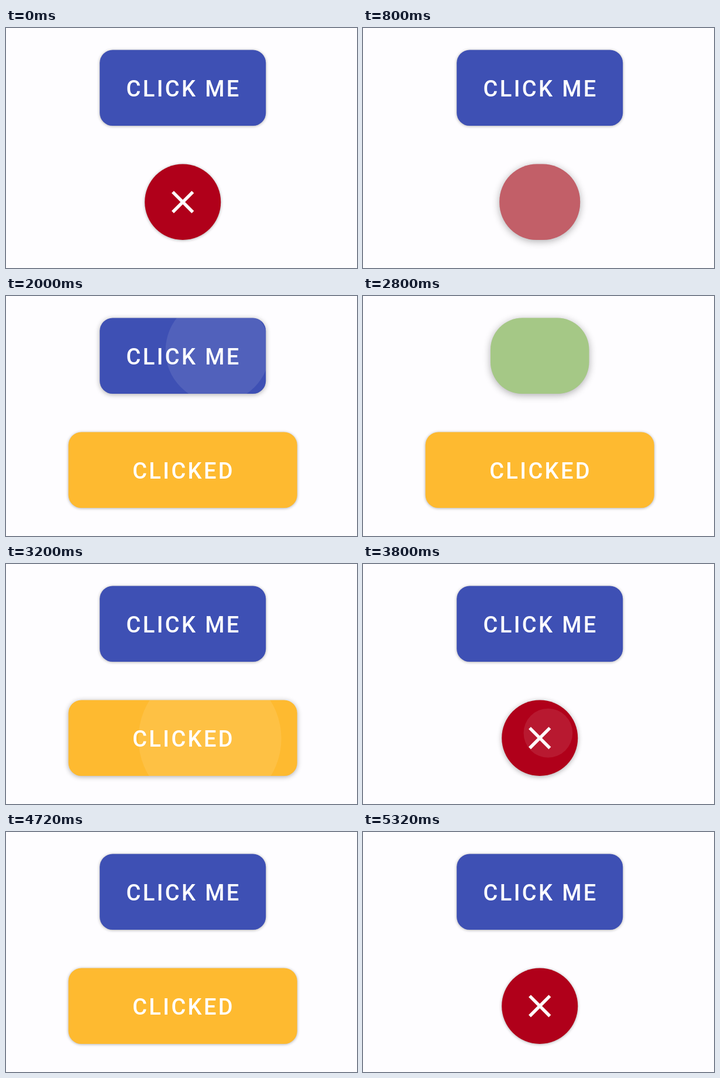
An HTML page with a canvas that plays this animation: 600x410 px, repeating every 5400 ms.

```html
<!DOCTYPE html>
<html lang="en">
<head>
<meta charset="utf-8">
<title>Morphing buttons</title>
<style>
  html, body { margin: 0; width: 100%; height: 100%; overflow: hidden; background: #fefdff; }
  canvas { display: block; }
</style>
</head>
<body>
<canvas id="stage" width="600" height="410"></canvas>
<script>
const ctx = document.getElementById('stage').getContext('2d');
const LOOP = 5400, STEP = 40, HEIGHT = 129.5, UNIT = 2.73;
const TOUCH_LEAD = 31; // a press begins shortly before its first visible step

const rect = (width, color, label, touch) => ({ width, radius: 22, color, label, touch });
const circle = (color, icon, touch) => ({ width: 130, radius: 65, color, icon, touch });

const cross = [[[-6.3, -6.3], [6.3, 6.3]], [[6.3, -6.3], [-6.3, 6.3]]];
const check = [[[-7.9, 0.7], [-3, 5.6], [8.3, -5.7]]];

const blue = rect(284, [62, 80, 180], 'CLICK ME', [63, -10]);
const green = circle([153, 204, 0], check, [15, -9]);
const red = circle([176, 0, 26], cross, [15, -9]);
const cyan = rect(391, [0, 221, 255], 'CLICKED', [49, 1]);
const amber = rect(391, [254, 186, 48], 'CLICKED', [49, 1]);

const buttons = [
  { y: 102.3, rest: blue, clicks: [[2000, blue, green], [2640, green, blue]] },
  { y: 297.3, rest: red, clicks: [
    [720, red, cyan], [1280, cyan, amber], [3200, amber, red],
    [3800, red, cyan], [4360, cyan, amber], [4960, amber, red]] }
];

const clamp = x => Math.min(1, Math.max(0, x));
const mix = (a, b, p) => a + (b - a) * p;
const swing = x => 0.5 - Math.cos(Math.PI * x) / 2;
const mixLight = (a, b, p) => mix(a ** 2.2, b ** 2.2, p) ** (1 / 2.2);

// cubic-bezier(0.4, 0, 0.2, 1), solved by bisection
function fastOutSlowIn(x) {
  let s = 0.5;
  for (let step = 0.25; step > 0.0005; step /= 2) {
    const guess = 1.2 * (1 - s) ** 2 * s + 0.6 * (1 - s) * s * s + s ** 3;
    s += guess < x ? step : -step;
  }
  return s * s * (3 - 2 * s);
}

function drawContent({ label, icon }) {
  if (label) {
    ctx.fillStyle = '#fff';
    ctx.font = '500 38px Roboto, sans-serif';
    ctx.letterSpacing = '3.39px';
    ctx.textAlign = 'center';
    ctx.fillText(label, 1.4, 14.9);
    return;
  }
  ctx.strokeStyle = '#fff';
  ctx.lineWidth = 2 * UNIT;
  ctx.beginPath();
  for (const line of icon) {
    line.forEach(([x, y], i) => ctx[i ? 'lineTo' : 'moveTo'](x * UNIT, y * UNIT));
  }
  ctx.stroke();
}

function drawRipple(age, width, [touchX, touchY]) {
  const grow = fastOutSlowIn(clamp(age / 225));
  const alpha = 0.24 * clamp(age / 75) * clamp((375 - age) / 150);
  if (!alpha) return;
  const radius = mix(0.3 * Math.max(width, HEIGHT), Math.hypot(width, HEIGHT) / 2, grow);
  ctx.save();
  ctx.clip();
  ctx.fillStyle = `rgba(255, 255, 255, ${alpha})`;
  ctx.beginPath();
  ctx.arc(touchX * (1 - grow), touchY * (1 - grow), radius, 0, 2 * Math.PI);
  ctx.fill();
  ctx.restore();
}

function drawButton({ y, rest, clicks }, time) {
  const click = clicks.filter(([at]) => at <= time).pop() || [-LOOP, rest, rest];
  const [at, from, to] = click;
  const elapsed = time - at, age = elapsed + TOUCH_LEAD;
  const opening = from.icon && to.label;
  const [start, duration] = opening ? [40, 360] : [50, 300];
  const progress = swing(clamp((elapsed - start) / duration));
  const width = mix(from.width, to.width, progress);
  const color = from.color.map((c, i) => Math.round(mixLight(c, to.color[i], progress)));
  const settled = start + duration + (opening ? 80 : 0);
  const lift = clamp(age / 80) * clamp((settled - elapsed) / 100);

  ctx.save();
  ctx.translate(302.2, y);
  ctx.beginPath();
  ctx.roundRect(-width / 2, -HEIGHT / 2, width, HEIGHT, mix(from.radius, to.radius, progress));
  ctx.fillStyle = `rgb(${color})`;
  ctx.shadowColor = 'rgba(0, 0, 0, 0.32)';
  ctx.shadowBlur = mix(5, 13, lift);
  ctx.shadowOffsetY = mix(0.7, 2.5, lift);
  ctx.fill();
  ctx.shadowColor = 'transparent';
  drawRipple(age, width, from.touch);

  if (progress === 0) drawContent(from);
  else if (progress === 1 || from.label === to.label) drawContent(to);
  ctx.restore();
}

function frame() {
  const time = Math.floor(performance.now() % LOOP / STEP) * STEP;
  ctx.fillStyle = '#fefdff';
  ctx.fillRect(0, 0, 600, 410);
  buttons.forEach(button => drawButton(button, time));
  requestAnimationFrame(frame);
}
frame();
</script>
</body>
</html>
```
